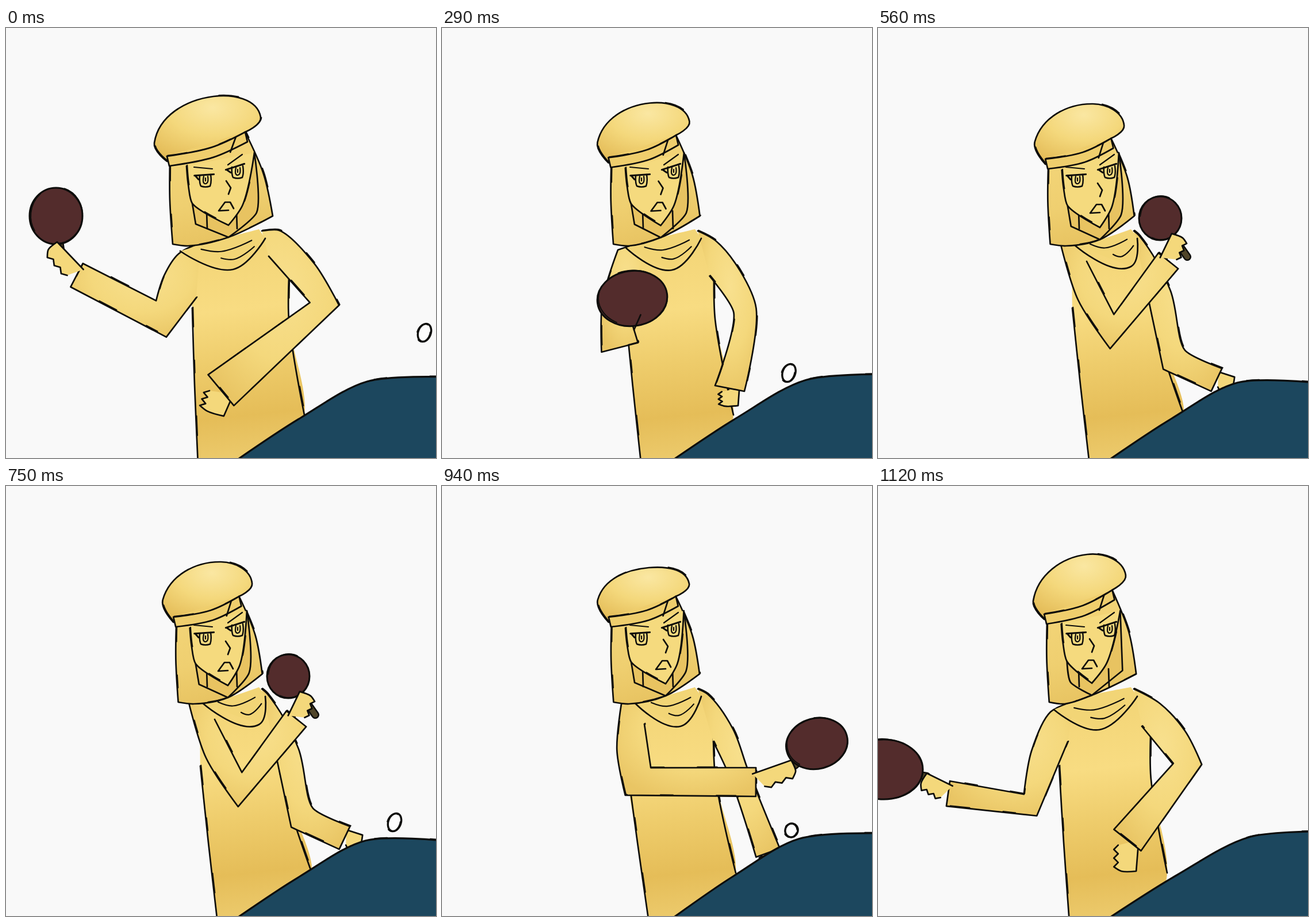
An HTML page for the animation above (1210 ms loop, 748 by 748 pixels).

```html
<!DOCTYPE html>
<html lang="en">
<head>
<meta charset="utf-8">
<title>Table tennis swing</title>
<style>
  html, body { margin: 0; width: 100%; height: 100%; overflow: hidden; background: #f9f9f9; }
  svg { display: block; width: 100vw; height: 100vh; }
</style>
</head>
<body>
<svg id="stage" viewBox="0 0 748 748" fill="none" stroke-linecap="round" stroke-linejoin="round">
  <defs>
    <linearGradient id="robe" gradientUnits="userSpaceOnUse" x1="380" y1="380" x2="420" y2="748">
      <stop offset="0" stop-color="#f3d577"/><stop offset=".3" stop-color="#f8dc82"/>
      <stop offset=".55" stop-color="#eecc6b"/><stop offset=".8" stop-color="#e5bd58"/>
      <stop offset="1" stop-color="#ecca6c"/>
    </linearGradient>
    <radialGradient id="sleeve" cx=".55" cy=".35" r=".7">
      <stop offset="0" stop-color="#f8e08e"/><stop offset=".55" stop-color="#f4d87c"/>
      <stop offset="1" stop-color="#e9c564"/>
    </radialGradient>
    <radialGradient id="felt" cx=".55" cy=".18" r=".85">
      <stop offset="0" stop-color="#fae7a2"/><stop offset=".5" stop-color="#f4d87c"/>
      <stop offset="1" stop-color="#e4bc58"/>
    </radialGradient>
    <linearGradient id="hood" x1="0" y1="0" x2=".2" y2="1">
      <stop offset="0" stop-color="#f4d77b"/><stop offset=".65" stop-color="#efcf70"/>
      <stop offset="1" stop-color="#e8c462"/>
    </linearGradient>
  </defs>
</svg>
<script>
const INK = '#0d0d0b', SKIN = '#f4d87b', SHADE = '#e8c361';
const LOOP = 1210, FRAMES = 13;
const stage = document.getElementById('stage');

// Joints of the four key drawings. robe: x of left side, left hem, right chest, right hem.
// Limb widths are half widths; table is its corner and the height of its far edge.
const POSES = [
  { // wind-up
    turn: 1, drop: 0, hatTop: [361, 119], chin: [387, 343],
    scarf: [303, 388], scarfLow: [395, 420], robe: [324, 334, 492, 519],
    top: [300, 393], pit: [331, 469], elbow: [270, 506], wrist: [123, 430], girth: [24, 23],
    freeTop: [475, 352], freePit: [457, 397], freeElbow: [554, 480], freeWrist: [374, 630], freeGirth: [18, 35],
    tip: [80, 380], freeTip: [362, 670], knuckles: 1,
    blade: [87, 327], size: [46, 49], tilt: 0, grip: [95, 385], table: [628, 615, 607]
  },
  { // arm back
    turn: .87, drop: 0, hatTop: [364, 119], chin: [372, 343],
    scarf: [306, 389], scarfLow: [385, 424], robe: [315, 333, 474, 503],
    top: [300, 393], pit: [330, 445], elbow: [265, 555], wrist: [122, 535], girth: [17, 22],
    freeTop: [490, 378], freePit: [459, 418], freeElbow: [538, 484], freeWrist: [434, 616], freeGirth: [20, 30],
    tip: [79, 510], freeTip: [434, 670], knuckles: 1,
    blade: [10, 493], size: [68, 52], tilt: 0, grip: [85, 505], table: [645, 611, 601]
  },
  { // contact
    turn: .86, drop: 10, hatTop: [360, 142], chin: [389, 344],
    scarf: [335, 377], scarfLow: [415, 418], robe: [322, 360, 472, 511],
    top: [312, 379], pit: [352, 414], elbow: [341, 514], wrist: [546, 515], girth: [24, 25],
    freeTop: [462, 362], freePit: [472, 445], freeElbow: [516, 499], freeWrist: [567, 638], freeGirth: [17, 22],
    tip: [612, 488], freeTip: [570, 645], knuckles: -1,
    blade: [652, 448], size: [54, 44], tilt: -15, grip: [614, 486], table: [620, 614, 604]
  },
  { // follow-through
    turn: .84, drop: 10, hatTop: [374, 132], chin: [386, 347],
    scarf: [340, 376], scarfLow: [440, 415], robe: [338, 368, 467, 532],
    top: [318, 377], pit: [363, 406], elbow: [407, 528], wrist: [505, 405], girth: [16, 22],
    freeTop: [455, 362], freePit: [470, 470], freeElbow: [515, 577], freeWrist: [589, 612], freeGirth: [23, 22],
    tip: [522, 362], freeTip: [618, 618], knuckles: -1,
    blade: [491, 331], size: [37, 38], tilt: 0, grip: [538, 398], table: [625, 617, 617]
  }
];

const add = (tag, attrs, parent = stage) => {
  const el = document.createElementNS('http://www.w3.org/2000/svg', tag);
  set(el, attrs);
  return parent.appendChild(el);
};
const set = (el, attrs) => { for (const k in attrs) el.setAttribute(k, attrs[k]); };

const mix = (a, b, f) => Array.isArray(a) ? a.map((v, i) => mix(v, b[i], f)) : a + (b - a) * f;
const shift = ([x, y], dx, dy) => [x + dx, y + dy];
const along = (p, dir, d) => [p[0] + dir[0] * d, p[1] + dir[1] * d];
const unit = (a, b) => {
  const x = b[0] - a[0], y = b[1] - a[1], len = Math.hypot(x, y) || 1e-6;
  return [x / len, y / len];
};
const normal = ([x, y]) => [-y, x];
const dot = (a, b) => a[0] * b[0] + a[1] * b[1];
const gap = (a, b) => Math.hypot(b[0] - a[0], b[1] - a[1]);

function poseAt(swing) {
  const i = Math.min(2, Math.floor(swing)), pose = {};
  for (const key in POSES[i]) pose[key] = mix(POSES[i][key], POSES[i + 1][key], swing - i);
  return pose;
}

// Line through points. Unless it is round, sharp turns become corners.
function curve(pts, round) {
  const dirs = pts.slice(1).map((p, i) => unit(pts[i], p));
  const tangents = pts.map((_, i) => {
    const a = dirs[i - 1], b = dirs[i];
    if (!a || !b) return [0, 0];
    const ease = round ? 1.1 : dot(a, b) < .6 ? 0 : dot(a, b);
    return along([0, 0], unit([0, 0], [a[0] + b[0], a[1] + b[1]]), ease);
  });
  return 'M' + pts[0] + dirs.map((_, i) => {
    const reach = gap(pts[i], pts[i + 1]) / 3;
    return `C${along(pts[i], tangents[i], reach)} ${along(pts[i + 1], tangents[i + 1], -reach)} ${pts[i + 1]}`;
  }).join('');
}

const updates = [];

// points(pose) gives the outline; the fill closes it, the ink stays open.
function shape(points, { fill, width = 2.7, round, rough } = {}) {
  const layers = [];
  if (fill) layers.push(add('path', { fill }));
  if (width) layers.push(add('path', { stroke: INK, 'stroke-width': width }));
  if (rough) layers.push(add('path', {
    stroke: INK, 'stroke-width': 2, 'stroke-dasharray': '34 58 22 75', transform: 'translate(1.3 -1.2)'
  }));
  updates.push(pose => {
    const d = curve(points(pose), round);
    layers.forEach(el => set(el, { d }));
  });
}

// Sleeve outline with a mitred elbow; side picks which edge runs to the shoulder top.
function sleeve(start, top, pit, elbow, wrist, [elbowGirth, cuff], side) {
  const n1 = normal(unit(mix(top, pit, .5), elbow)), n2 = normal(unit(elbow, wrist));
  const bend = unit([0, 0], [n1[0] + n2[0], n1[1] + n2[1]]);
  const reach = side * elbowGirth / Math.max(.5, dot(bend, n1));
  const outer = along(elbow, bend, reach);
  const bow = along(mix(top, outer, .5), n1, side * gap(top, outer) * .07);
  return [start, top, bow, outer, along(wrist, n2, side * cuff),
    along(wrist, n2, -side * cuff), along(elbow, bend, -reach), pit];
}

// Fist from wrist to tip, with finger bumps back along one side.
function fist(wrist, tip, girth, side) {
  const n = normal(unit(wrist, tip));
  const pts = [along(wrist, n, side * girth * .9), along(tip, n, side * girth * .7), along(tip, n, -side * girth * .5)];
  for (let i = 1; i <= 6; i++) {
    pts.push(along(mix(tip, wrist, i * .14), n, -side * girth * (i % 2 ? 1.1 : .75)));
  }
  return pts;
}

// Robe
const COLLAR_END = [451, 366];
const leftSide = p => [[p.robe[0], 487], [mix(p.robe[0], p.robe[1], .5) - 1, 620], [p.robe[1], 760]];
const rightSide = p => {
  const chest = [p.robe[2], 437], hem = [p.robe[3], 673];
  return [chest, shift(mix(chest, hem, .3), -8, 0), hem];
};
shape(p => [p.scarf, ...leftSide(p), [480, 760], ...rightSide(p).reverse(), COLLAR_END],
  { fill: 'url(#robe)', width: 0 });
shape(leftSide, { rough: true });
shape(rightSide, { rough: true });

// Arms
shape(p => fist(p.freeWrist, p.freeTip, p.freeGirth[1] * .72, -1), { fill: SKIN });
shape(p => sleeve([445, 353], p.freeTop, p.freePit, p.freeElbow, p.freeWrist, p.freeGirth, -1),
  { fill: 'url(#sleeve)', rough: true });
shape(p => sleeve(shift(p.scarf, 35, -14), p.top, p.pit, p.elbow, p.wrist, p.girth, 1),
  { fill: 'url(#sleeve)', rough: true });

// Scarf
const throat = p => shift(p.chin, 0, 21);
const scarfEdge = p => [p.scarf, p.scarfLow, COLLAR_END];
shape(p => [...scarfEdge(p), [440, 350], throat(p), p.scarf], { fill: '#f2d576', width: 0 });
shape(scarfEdge, { round: true });
for (const i of [0, 1]) {
  shape(p => {
    const mid = mix(p.scarf, COLLAR_END, .5);
    const drop = f => [(p.scarfLow[0] - mid[0]) * f, (p.scarfLow[1] - mid[1]) * f];
    const a = shift(mix(p.scarf, COLLAR_END, .24 + i * .18), ...drop(.05 + i * .45));
    const b = shift(mix(p.scarf, COLLAR_END, .84), ...drop(i * .25));
    return [a, shift(mix(a, b, .4), 0, 10), b];
  }, { width: 2.2, round: true });
}

// Head: one set of proportions, squeezed about its axis as it turns
const head = (p, x, y, drop = 0) => [350 + x * p.turn, y + drop * p.drop];
const bandLeft = p => head(p, -70, 223, .5), bandRight = p => head(p, 66, 181, 1.1);
const templeLeft = p => head(p, -36, 240, .7), templeRight = p => head(p, 82, 217);
const cheek = p => [templeLeft(p)[0] + 10, p.chin[1] - 38];

shape(p => {
  const left = head(p, -60, 376), right = head(p, 114, 327), end = bandRight(p);
  return [shift(bandLeft(p), 5, 10), mix(bandLeft(p), left, .5), left, shift(left, 27, 3),
    throat(p), right, shift(mix(right, end, .5), 8, 0), end];
}, { fill: 'url(#hood)', rough: true });
shape(p => [cheek(p), shift(cheek(p), 6, 36), throat(p), [templeRight(p)[0] + 4, p.chin[1] - 22], templeRight(p)],
  { fill: SHADE });
for (const x of [350, 402]) shape(() => [[x - 1, 318], [x, 349]]);
shape(p => [templeLeft(p), shift(mix(templeLeft(p), cheek(p), .5), -2, 0), cheek(p), p.chin,
  shift(mix(p.chin, templeRight(p), .3), 11, 3), templeRight(p)], { fill: '#f5da7e', rough: true });

function eye(x, y, slope) {
  const g = add('g', { stroke: INK, transform: `translate(${x} ${y})` });
  add('path', { d: 'M-19-9L15-10M-17-8L-12-2', 'stroke-width': 3, transform: `rotate(${slope})` }, g);
  add('path', { d: 'M-10-8Q-11 4-8 10Q0 13 8 10Q11 2 9-10', 'stroke-width': 2.5 }, g);
  add('path', { d: 'M-3-7Q-6 6 0 6Q6 5 4-7M0-4V1', 'stroke-width': 2.2 }, g);
}
eye(347, 265, -2);
eye(403, 250, -16);
shape(() => [[327, 242], [359, 245]], { width: 2.2 });
shape(() => [[386, 238], [411, 220]], { width: 2.2 });
const feature = (...offsets) => shape(p => offsets.map(([x, y]) => shift(p.chin, x, y)));
feature([-4, -77], [4, -65], [0, -54]);
feature([0, -26], [-17, -25], [-6, -40], [3, -40], [9, -29]);

// Hat
const bandEdge = (p, dx, dy) => {
  const a = shift(bandLeft(p), dx, dy), b = shift(bandRight(p), dx, dy);
  return [a, shift(mix(a, b, .55), 2, 8), b];
};
shape(p => [shift(bandLeft(p), 0, 9), head(p, -92, 200, -.2), p.hatTop, head(p, 93, 155, 1.5), bandRight(p)],
  { fill: 'url(#felt)', round: true, rough: true });
shape(p => [bandLeft(p), ...bandEdge(p, 4, 17), bandRight(p)], { fill: '#efce6d', width: 0 });
shape(p => bandEdge(p, 0, 0), { round: true, rough: true });
shape(p => [bandLeft(p), ...bandEdge(p, 4, 17), bandRight(p)]);
shape(p => [shift(mix(bandLeft(p), bandRight(p), .88), 0, 4), shift(mix(bandLeft(p), bandRight(p), .81), 0, 27)]);

// Paddle and playing hand
const handle = p => [p.blade, p.grip];
shape(handle, { width: 14 });
const wood = add('path', { stroke: '#504529', 'stroke-width': 9 });
const blade = add('ellipse', { fill: '#532c2c', stroke: INK, 'stroke-width': 3 });
const rim = add('ellipse', { stroke: INK, 'stroke-width': 2, 'stroke-dasharray': '70 45' });
updates.push(p => {
  const [cx, cy] = p.blade, [rx, ry] = p.size;
  set(wood, { d: curve(handle(p)) });
  set(blade, { cx, cy, rx, ry, transform: `rotate(${p.tilt} ${cx} ${cy})` });
  set(rim, { cx: cx + 1, cy: cy - 1, rx: rx - 1, ry, transform: `rotate(${p.tilt + 6} ${cx} ${cy})` });
});
shape(p => fist(p.wrist, p.tip, 17, p.knuckles), { fill: SKIN });

// Table
shape(p => {
  const [x, y, edge] = p.table, near = [398, 754], corner = [x, y];
  return [near, shift(mix(near, corner, .5), -1, -6), corner, [760, edge], [760, 760], near];
}, { fill: '#1c475e', width: 3.2, rough: true });

// Ball
const ball = add('g', { stroke: INK });
const ballShape = add('ellipse', { fill: '#fdfdfd', 'stroke-width': 3.4 }, ball);
const ballSketch = add('ellipse', { cx: -1.5, cy: 1, 'stroke-width': 2, 'stroke-dasharray': '26 14' }, ball);

// It drops in, bounces on drawing 2, streaks away on 4 and drifts back from 7 to 10.
function ballAt(n) {
  if (n === 4) return { x: 743, y: 519, rx: 20, ry: 8, tilt: -12 };
  if (n < 4) {
    const bounce = n === 2;
    return { x: 728 - 41.5 * n, y: 670 - 70 * Math.abs(n - 2),
      rx: bounce ? 15 : 11, ry: bounce ? 9 : 16, tilt: bounce ? -25 : 20 };
  }
  const k = n - 8;
  return n >= 7 && n <= 10 && { x: 676 - 34 * k, y: 585 + 7 * k, rx: 11, ry: 16 - 2 * Math.max(0, k), tilt: 20 };
}

function drawBall(n) {
  const spot = ballAt(n);
  set(ball, { visibility: spot ? 'visible' : 'hidden' });
  if (!spot) return;
  const { x, y, rx, ry, tilt } = spot;
  set(ball, { transform: `translate(${x} ${y}) rotate(${tilt})` });
  set(ballShape, { rx, ry });
  set(ballSketch, { rx, ry });
}

// Drawings start on a 10 ms grid; the swing runs forward, rests, and runs back.
const startOf = n => Math.ceil(n * LOOP / FRAMES / 10 - .01) * 10;
const swingAt = n => Math.min(n / 2, 3, (14 - n) / 2);

let shown = -1;
function render(now) {
  const t = now % LOOP;
  let n = FRAMES - 1;
  while (n > 0 && startOf(n) > t) n--;
  if (n === shown) return;
  shown = n;
  const pose = poseAt(swingAt(n));
  updates.forEach(update => update(pose));
  drawBall(n);
}

const began = performance.now();
function tick() {
  render(performance.now() - began);
  requestAnimationFrame(tick);
}
tick();
</script>
</body>
</html>
```
